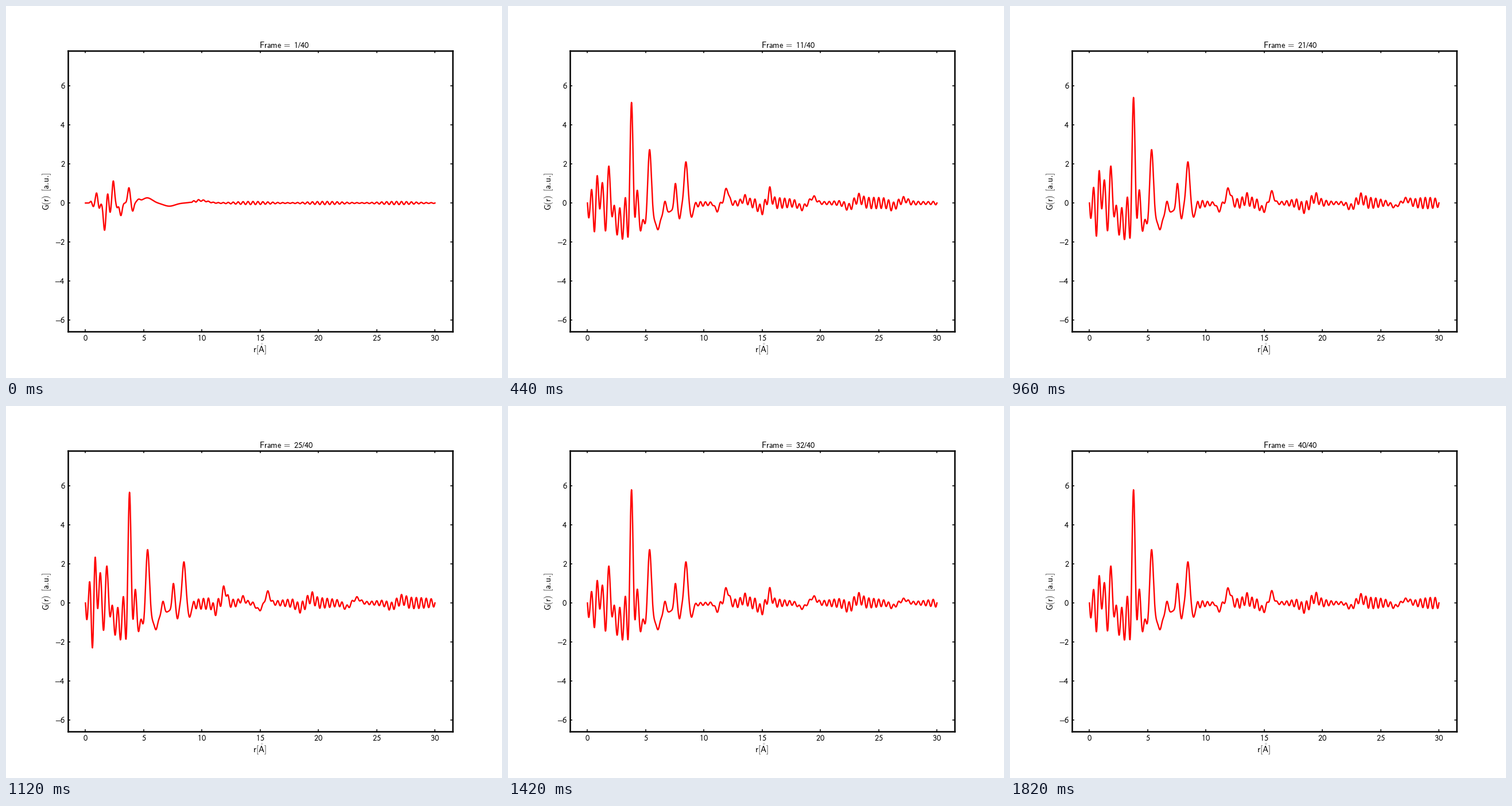
These frames come from a looping animation (864x648 px, 1.84 s). A matplotlib script:

```python
import numpy as np
import matplotlib.pyplot as plt
from matplotlib.animation import FuncAnimation

W, H, DPI = 864, 648, 72
COUNT = 40
FREEZE = 10    # first crystalline measurement, with a large artefact
Q_MAX = 14.1   # cut-off that causes the termination ripples
R = np.linspace(0, 30, 1501)

plt.rcParams["mathtext.fontset"] = "cm"

# Peaks and dips as (r, height, width).
LIQUID = [(.47, .1, .1), (.68, -.2, .12), (.95, .55, .13), (1.18, -.3, .11),
          (1.64, -1.48, .15), (1.9, .58, .12), (2.12, -.55, .12),
          (2.39, 1.2, .14), (2.72, -.25, .12), (3.04, -.68, .15),
          (3.73, .83, .15), (4.05, -.45, .14), (4.55, .15, .2),
          (5.3, .28, .6), (7.2, -.17, .7), (9.9, .14, .8)]
CRYSTAL = [(1.07, .7, .25), (2.08, .7, .17), (3.4, .8, .2), (4.15, 1.75, .22),
           (5.34, 3.8, .22), (6.06, -.5, .17), (6.65, .7, .17),
           (7.55, 1.3, .15), (7.9, -.6, .14), (8.45, 2.25, .21),
           (8.93, -.65, .18), (11.1, -.4, .2), (11.95, .75, .25),
           (13.5, .25, .3), (14.9, -.35, .35), (15.65, .55, .25),
           (18.4, -.25, .4), (19.4, .3, .35), (22.4, -.22, .4),
           (23.3, .25, .4), (26.2, -.18, .4), (27.2, .18, .4)]


def bell(c, h, w):
    return h * np.exp(-((R - c) / w) ** 2)


def sharp(c, h):
    """Band-limited peak with its fading side lobes."""
    return bell(c, h, 1.3) * np.sinc(Q_MAX * (R - c) / np.pi)


def wave(start, period):
    return np.cos(2 * np.pi * (R - start) / period)


def far_ripple(n, amp):
    rng = np.random.default_rng(n)
    beat = np.sin(rng.uniform(.6, 1.4) * R + rng.uniform(0, 2 * np.pi))
    rise = 1 / (1 + np.exp(-(R - 9.2) / .1))
    return amp * rise * (1 + .6 * beat) * wave(13.53, .425)


def artefact():
    """Spurious oscillation at very small r."""
    return bell(1.15, .9, .25) - bell(.72, 1.6, .4) * wave(.1, .49)


def liquid(n):
    gain = .93 + .018 * n
    return gain * sum(bell(*p) for p in LIQUID) + far_ripple(n, .05)


def crystal(n):
    growth = np.clip((n - 15) / 14, 0, 1)
    growth *= growth * (3 - 2 * growth)
    density = -1.1 / (1 + ((R - 4.2) / 2.6) ** 4)
    near_ripple = -.55 * wave(.1, .483) / (1 + (R / 3.2) ** 16)
    swing = .55 + .5 * np.cos(2 * np.pi * (n - 25.5) / 20)
    level = 3.7 if n == FREEZE else swing
    return (sum(bell(*p) for p in CRYSTAL) + sharp(1.85, 2)
            + sharp(3.78, 6.1 + .65 * growth) + density + near_ripple
            + level * artefact() + far_ripple(n, .18))


CURVES = [(liquid if n < FREEZE else crystal)(n) * np.tanh(R / .05)
          for n in range(1, COUNT + 1)]
# One tick is 20 ms; every third measurement is held for 100 ms.
ORDER = [n for n in range(1, COUNT + 1) for _ in range(5 if n % 3 == 2 else 1)]

fig = plt.figure(figsize=(W / DPI, H / DPI), dpi=DPI, facecolor="white")
left, right, top, bottom = 108, 777.6, 77.8, 567.4
ax = fig.add_axes([left / W, 1 - bottom / H, (right - left) / W, (bottom - top) / H])
ax.set(xlim=(-1.5, 31.5), ylim=(-6.602, 7.815),
       xticks=range(0, 31, 5), yticks=range(-6, 7, 2))
ax.tick_params(direction="in", top=True, right=True, length=4, width=1.5,
               labelbottom=False, labelleft=False)
for spine in ax.spines.values():
    spine.set_linewidth(2.5)


def sans(s):
    return rf"$\mathsf{{{s}}}$"


def label(x, y, s, size=14.4, **kw):
    return fig.text(x / W, 1 - y / H, sans(s), fontsize=size, **kw)


def number(x, y, s, **kw):
    return label(x, y, s, math_fontfamily="stixsans", **kw)


for v in range(0, 31, 5):
    number(138.4 + 20.29 * v, 582.6, v, ha="center")
for v in range(-6, 7, 2):
    number(103.3, 348.2 - 33.96 * v, v, ha="right")
label(441.8, 603, r"r[\mathring{A}]", 15, ha="center")
label(75, 322.8, r"G(r)\ \,[a.\!u.\!]", 15, ha="center", va="baseline",
      rotation=90, rotation_mode="anchor")
label(441.3, 73, r"Frame\,=")
counter = number(501, 73, "")
line, = ax.plot(R, CURVES[0], color="red", lw=2.4)


def update(i):
    n = ORDER[i]
    line.set_ydata(CURVES[n - 1])
    counter.set_text(sans(f"{n}/{COUNT}"))
    return line, counter


anim = FuncAnimation(fig, update, frames=len(ORDER), interval=20,
                     repeat=True, repeat_delay=0, blit=False)
plt.show()
```
